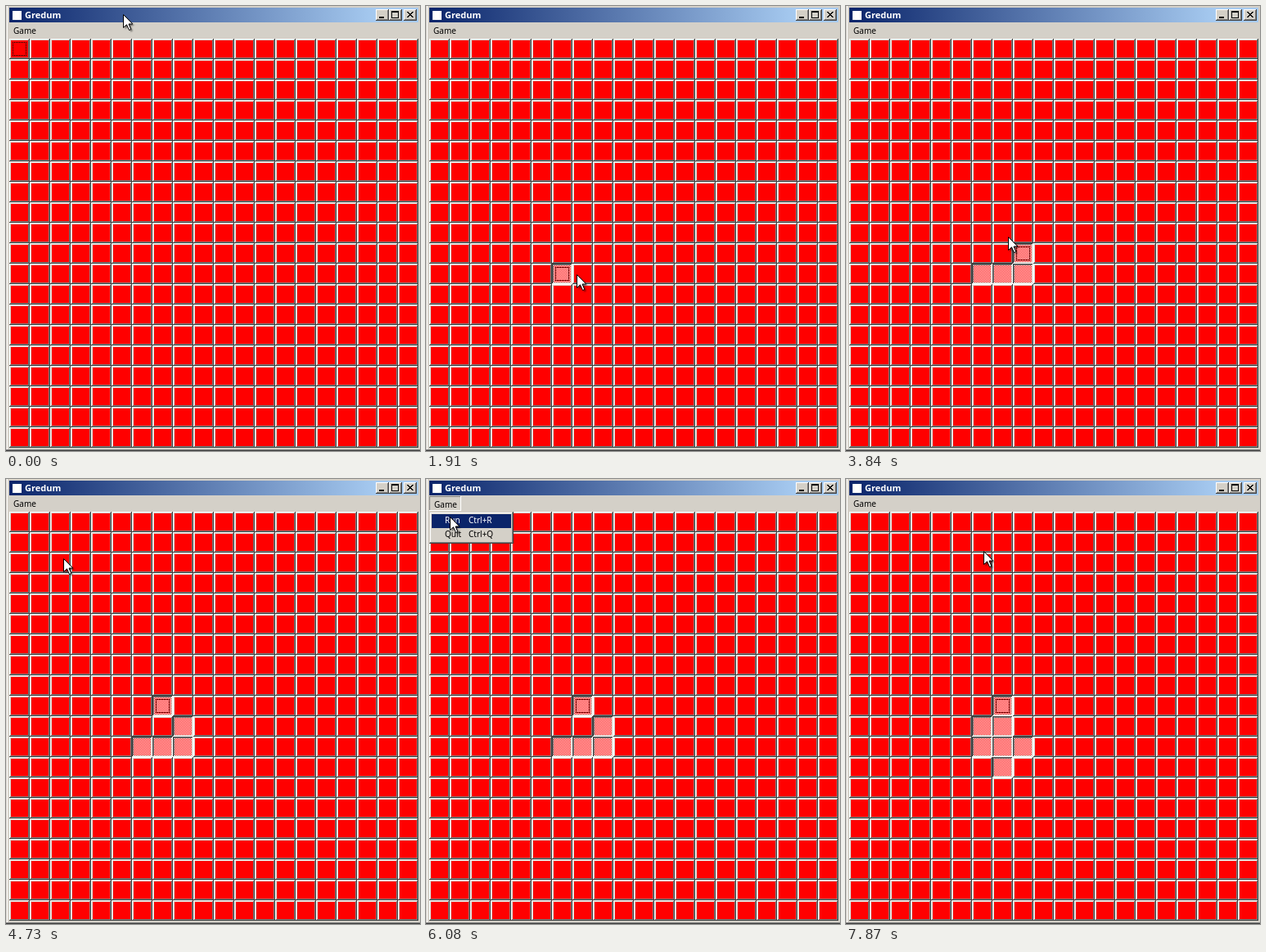
An HTML page with a canvas for the animation above (8 s loop, 506 by 544 pixels).

```html
<!DOCTYPE html>
<html lang="en">
<head>
<meta charset="utf-8">
<title>Gredum</title>
<style>
  html, body { margin: 0; width: 100%; height: 100%; overflow: hidden; background: #d4d0c8; }
  canvas { display: block; }
</style>
</head>
<body>
<canvas id="stage" width="506" height="544"></canvas>
<script>
const ctx = document.getElementById('stage').getContext('2d');
const LOOP = 8000, TICK = 148.4, LEAD = 20;
const FACE = '#d4d0c8', WHITE = '#fff', GREY = '#808080', DARK = '#404040', NAVY = '#0a246a';
const CELL = 25, COUNT = 20, LEFT = 4, TOP = 40;
const HOVER = 35, OPEN = 36, POPUP = 38, CHOSEN = 43, FADED = 45;

// Pointer moves in ticks; a press happens just before leaving.
const moves = [
  { start: 0, end: 4, x: 70, y: 230 },
  { start: 4, end: 6, x: 145, y: 340 },
  { start: 6, end: 9, x: 160, y: 326 },
  { start: 10, end: 13, x: 184, y: 328, press: true },
  { start: 14, end: 17, x: 212, y: 334, press: true },
  { start: 17, end: 20, x: 212, y: 303, press: true },
  { start: 24, end: 27, x: 196, y: 279, press: true },
  { start: 28, end: 36, x: 28, y: 36, press: true },
  { start: 39, end: 41, x: 29, y: 46 },
  { start: 47, end: 50, x: 168, y: 88 }
];

// Rows of live cells, placed from column 6, row 9
const generations = [
  { start: 46, rows: ['.#.', '#.#', '###', '.#.'] },
  { start: 50, rows: ['.#.', '#.#', '###', '.##'] },
  { start: 53, rows: ['.#.', '##.', '###', '.#.'] }
];

function rect(x, y, w, h, color) {
  ctx.fillStyle = color;
  ctx.fillRect(x, y, w, h);
}

// The four sides never overlap, so they also blend evenly.
function edge(x, y, w, h, light, dark) {
  rect(x, y, w - 1, 1, light);
  rect(x, y + 1, 1, h - 2, light);
  rect(x, y + h - 1, w, 1, dark);
  rect(x + w - 1, y, 1, h - 1, dark);
}

function bevel(x, y, w, h, face, sunken = false) {
  edge(x, y, w, h, sunken ? DARK : WHITE, sunken ? WHITE : DARK);
  edge(x + 1, y + 1, w - 2, h - 2, sunken ? GREY : FACE, sunken ? FACE : GREY);
  rect(x + 2, y + 2, w - 4, h - 4, face);
}

function text(str, x, y, color = '#000', font = '10px') {
  ctx.font = font + ' "Noto Sans", sans-serif';
  ctx.fillStyle = color;
  ctx.fillText(str, x, y);
}

function drawCell(col, row, on, focused) {
  const x = LEFT + col * CELL, y = TOP + row * CELL;
  bevel(x, y, CELL, CELL, '#f00', on);
  if (on) {
    for (let j = 2; j < 23; j++)
      for (let i = 2 + j % 2; i < 23; i += 2) rect(x + i, y + j, 1, 1, WHITE);
  }
  if (focused) {
    for (let i = 4; i <= 20; i += 2)
      for (const [dx, dy] of [[i, 4], [i, 20], [4, i], [20, i]]) rect(x + dx, y + dy, 1, 1, '#000');
  }
}

function drawWindow() {
  rect(0, 0, 506, 544, FACE);
  rect(1, 0, 1, 542, WHITE);
  rect(0, 542, 506, 1, GREY);
  rect(0, 543, 506, 1, DARK);

  const shade = ctx.createLinearGradient(4, 0, 452, 0);
  shade.addColorStop(0, NAVY);
  shade.addColorStop(1, '#a6caf0');
  rect(4, 2, 500, 18, shade);
  rect(8, 6, 11, 11, WHITE);
  text('Gredum', 23, 15, WHITE, 'bold 11px');

  for (const x of [452, 468, 486]) bevel(x, 4, 16, 14, FACE);
  rect(456, 13, 6, 2, '#000');
  rect(471, 6, 9, 9, '#000');
  rect(472, 8, 7, 6, FACE);
  for (let i = 0; i < 7; i++) {
    rect(490 + i, 7 + i, 2, 1, '#000');
    rect(496 - i, 7 + i, 2, 1, '#000');
  }
}

function drawMenu(tick, pointerY) {
  const open = tick >= OPEN && tick < CHOSEN;
  if (tick >= HOVER && tick < CHOSEN) edge(4, 21, 39, 18, open ? GREY : WHITE, open ? WHITE : GREY);
  text('Game', 9 + open, 34 + open);
  if (tick < POPUP || tick >= FADED) return;

  const selected = pointerY >= 43;
  const ink = selected ? WHITE : '#000';
  if (tick === POPUP) ctx.globalAlpha = 0.75;
  if (!open) ctx.globalAlpha = (FADED - tick) / 3;
  if (open) {
    edge(4, 40, 103, 39, FACE, DARK);
    edge(5, 41, 101, 37, WHITE, GREY);
    rect(6, 42, 99, 35, FACE);
    text('Quit', 23, 71);
    text('Ctrl+Q', 52, 71);
  }
  if (selected) rect(7, 43, 97, 17, NAVY);
  text('Run', 23, 54, ink);
  text('Ctrl+R', 52, 54, ink);
  ctx.globalAlpha = 1;
}

const arrow = new Path2D('M.5 .5V16.5L4.5 12.8L7.5 19.5L9.8 18.5L7 12H11.8Z');

function drawPointer(x, y) {
  ctx.save();
  ctx.translate(Math.round(x), Math.round(y));
  ctx.shadowColor = 'rgba(0,0,0,.5)';
  ctx.shadowOffsetX = ctx.shadowOffsetY = 2;
  ctx.shadowBlur = 2;
  ctx.fillStyle = WHITE;
  ctx.fill(arrow);
  ctx.shadowColor = 'transparent';
  ctx.stroke(arrow);
  ctx.restore();
}

// Follows the pointer up to a tick, pressing the cells under it.
function stateAt(tick) {
  let x = 143, y = 10, focus = '0,0', live = new Set();
  for (const move of moves) {
    if (move.start > tick) break;
    if (move.press) {
      focus = Math.floor((x - LEFT) / CELL) + ',' + Math.floor((y - TOP) / CELL);
      live.add(focus);
    }
    const left = 1 - Math.min(1, (tick - move.start) / (move.end - move.start));
    const eased = 1 - left * left;
    x += (move.x - x) * eased;
    y += (move.y - y) * eased;
  }
  for (const { start, rows } of generations) {
    if (start > tick) break;
    live = new Set();
    rows.forEach((row, j) => [...row].forEach((c, i) => {
      if (c === '#') live.add((6 + i) + ',' + (9 + j));
    }));
  }
  return { x, y, focus, live };
}

function draw(tick) {
  const { x, y, focus, live } = stateAt(tick);
  drawWindow();
  for (let row = 0; row < COUNT; row++) {
    for (let col = 0; col < COUNT; col++) {
      const key = col + ',' + row;
      drawCell(col, row, live.has(key), key === focus);
    }
  }
  drawMenu(tick, y);
  drawPointer(x, y);
}

let shown = -1;
function frame() {
  const tick = Math.floor((performance.now() % LOOP + LEAD) / TICK);
  if (tick !== shown) draw(shown = tick);
  requestAnimationFrame(frame);
}
frame();
</script>
</body>
</html>
```
